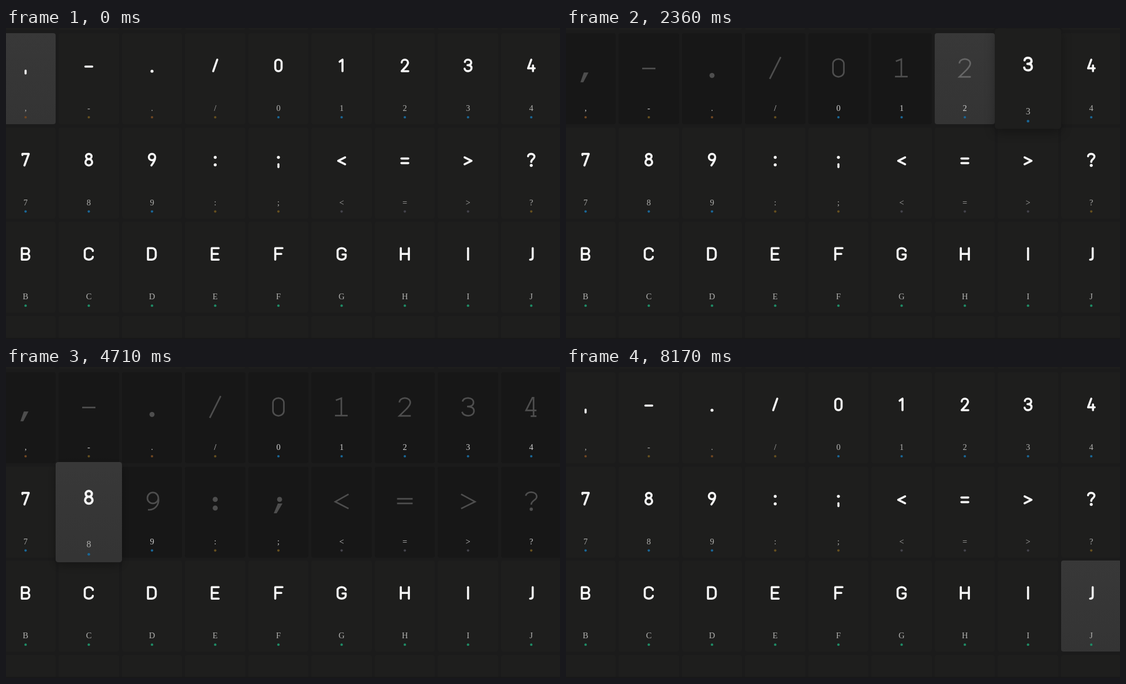
These frames come from a looping animation (960x540 px, 8.23 s). An HTML page with a canvas:

```html
<!DOCTYPE html>
<html lang="en">
<head>
<meta charset="utf-8">
<title>Glyph grid</title>
<style>
html, body { margin: 0; width: 100%; height: 100%; overflow: hidden; background: #1b1b1b; }
canvas { display: block; }
</style>
</head>
<body>
<canvas id="stage" width="960" height="540"></canvas>
<script>
const ctx = document.getElementById('stage').getContext('2d');
const LOOP = 8230;
const ROWS = [',-./01234', '789:;<=>?', 'BCDEFGHIJ'];
const LAST = 26;

// Centre lines of the bold rounded letterforms, cap height -10..10
const BOLD = {
  ',': 'M0 9V14',
  '-': 'M-6 2H6',
  '.': '',
  '/': 'M-3.5 10L3.5-10',
  '0': 'M-5.5-4.5a5.5 5.5 0 0 1 11 0v9a5.5 5.5 0 0 1-11 0z',
  '1': 'M-3.5-6.5L1.5-10V10',
  '2': 'M-5.5-5a5.5 5 0 0 1 11 0c0 3-2 5-4 7.5L-5.5 10H6',
  '3': 'M-5.5-6C-5-11.5 5.5-11.5 5.5-5C5.5-1.5 3-.5-1-.5C3-.5 6 1 6 4.5C6 11.5-5 11.5-6 5.5',
  '4': 'M0-10L-5.5 5H6M3 0V10',
  '7': 'M-5.5-8V-10H5.5L-2 10',
  '8': 'M-4.8-5.5a4.8 4.5 0 1 1 9.6 0a4.8 4.5 0 1 1-9.6 0zM-5.8 4.5a5.8 5.5 0 1 1 11.6 0a5.8 5.5 0 1 1-11.6 0z',
  '9': 'M5.5-4.5a5.5 5.5 0 1 0-11 0a5.5 5.5 0 1 0 11 0C5.5 0 3 5-1 10',
  ':': '',
  ';': 'M0 8V13',
  '<': 'M6-4L-6 2L6 8',
  '=': 'M-6-2H6M-6 6H6',
  '>': 'M-6-4L6 2L-6 8',
  '?': 'M-5.5-6C-5-11.5 5.5-11.5 5.5-5C5.5-1 0-1 0 4',
  'B': 'M-6.5 0H1a5 5 0 0 0 0-10H-6.5V10H1.5a5 5 0 0 0 0-10',
  'C': 'M7-5a7 5 0 0 0-14 0v10a7 5 0 0 0 14 0',
  'D': 'M-7-10V10H0a6.5 6.5 0 0 0 6.5-6.5V-3.5A6.5 6.5 0 0 0 0-10z',
  'E': 'M6-10H-6V10H6M-6 0H4.5',
  'F': 'M7-10H-5.5V10M-5.5 0H5',
  'G': 'M7-5a7 5 0 0 0-14 0v10a7 5 0 0 0 14 0V1H1.5',
  'H': 'M-7-10V10M7-10V10M-7 0H7',
  'I': 'M0-10V10',
  'J': 'M2.5-10V6C2.5 9 1 10-2 10'
};

// Slabs added to the same centre lines for the thin placeholder
const SLABS = {
  'B': 'M-8-10h2M-8 10h2',
  'C': 'M7-10v5',
  'D': 'M-8-10h2M-8 10h2',
  'E': 'M-8-10h2M-8 10h2M6.5-10v4M6.5 10v-5M2-2v4',
  'F': 'M-8-10h2M-8 10h7M7-10v4M2-2v4',
  'G': 'M7-10v5M7 1h1.5',
  'H': 'M-8.5-10h5M3.5-10h5M-8.5 10h5M3.5 10h5',
  'I': 'M-6-10h12M-6 10h12',
  'J': 'M-3-10H7'
};

// Placeholders with a shape of their own
const THIN = {
  ',': '', ';': '',
  '-': 'M-11.5 1H11.5',
  '/': 'M-9.5 19L9.5-19',
  '1': 'M-10-11.5L-.5-15V15M-11.5 15H10.5',
  '4': 'M4 16V-16H2L-9 6H9M-1 16H9',
  '9': 'M11-5.5a9.5 9.5 0 1 0-19 0a9.5 9.5 0 1 0 19 0C13 6 5 16-7 15',
  '<': 'M12-12L-11 1L12 13',
  '=': 'M-13.5-4H13.5M-13.5 4H13.5',
  '>': 'M-12-12L12 1L-12 13'
};

// Slanted tails of the thin comma and semicolon
const TAILS = {
  ',': new Path2D('M-3 8H5L-4 25H-9z'),
  ';': new Path2D('M-1 4H7L-3 21H-8z')
};

// Heights of round dots: bold, then thin
const DOTS = {
  '.': [[10], [13]],
  ':': [[-4, 9], [-3, 12]],
  ';': [[-4], [-3]],
  '?': [[10], [14]]
};

function thinPath(ch) {
  if (ch in THIN) return new Path2D(THIN[ch]);
  const path = new Path2D();
  const tall = ch in SLABS ? 1.48 : 1.55;
  path.addPath(new Path2D(BOLD[ch] + (SLABS[ch] || '')), new DOMMatrix([1.72, 0, 0, tall, 0, 0]));
  return path;
}

function dotColor(ch) {
  if (/\d/.test(ch)) return '#1a6797';
  if (/[A-Z]/.test(ch)) return '#1f8c66';
  if (/[<=>]/.test(ch)) return '#44434b';
  return /[,.]/.test(ch) ? '#704722' : '#66501f';
}

const cardX = col => 33.95 + 109.53 * col;
const cardY = row => 88 + 163.6 * row;

// Cells in the order they are visited: right, back left, right again
const cells = [];
ROWS.forEach((chars, row) => {
  [...chars].forEach((ch, col) => {
    cells.push({
      ch, x: cardX(col), y: cardY(row),
      order: row * 9 + (row === 1 ? 8 - col : col),
      bold: new Path2D(BOLD[ch]), thin: thinPath(ch), dot: dotColor(ch)
    });
  });
});

const pickAt = k => k === 0 ? 0 : 816 + 241.8 * k;
const clearAt = k => 896 + 244 * k;
const undoAt = k => 8170 - 31.7 * k;

function disc(x, y, r) {
  ctx.beginPath();
  ctx.arc(x, y, r, 0, Math.PI * 2);
  ctx.fill();
}

function cardShape(x, y, scale) {
  const w = 104.4 * scale, h = 158 * scale;
  const left = Math.round(x - w / 2), top = Math.round(y - h / 2);
  ctx.beginPath();
  ctx.roundRect(left, top, Math.round(x + w / 2) - left, Math.round(y + h / 2) - top, 4 * scale);
}

function drawGlyph(cell, empty) {
  const { ch } = cell;
  ctx.save();
  ctx.translate(0, empty ? -18.7 : -23);
  ctx.lineCap = empty ? 'butt' : 'round';
  ctx.lineJoin = empty ? 'miter' : 'round';
  ctx.lineWidth = empty ? 2.7 : 3.6;
  ctx.strokeStyle = ctx.fillStyle = empty ? 'rgba(255,255,255,.24)' : '#f6f6f6';
  ctx.stroke(empty ? cell.thin : cell.bold);
  if (empty && TAILS[ch]) ctx.fill(TAILS[ch]);
  for (const y of (DOTS[ch] || [[], []])[empty ? 1 : 0]) {
    disc(empty && ch === ';' ? 2 : 0, y, empty ? (ch === '?' ? 2.8 : 4.4) : 2.6);
  }
  ctx.restore();
}

function drawCell(cell, t, picked, raised) {
  const k = cell.order;
  const empty = t >= clearAt(k) && t < undoAt(k);
  const scale = raised ? 1.1 : 1;

  ctx.save();
  if (raised) {
    ctx.shadowColor = 'rgba(0,0,0,.3)';
    ctx.shadowBlur = 18;
    ctx.shadowOffsetY = 6;
  }
  if (picked) {
    const shade = ctx.createLinearGradient(0, cell.y - 79, 0, cell.y + 79);
    shade.addColorStop(0, '#383838');
    shade.addColorStop(1, '#343434');
    ctx.fillStyle = shade;
  } else {
    ctx.fillStyle = empty ? '#171717' : '#1e1e1d';
  }
  cardShape(cell.x, cell.y, scale);
  ctx.fill();
  ctx.restore();

  ctx.save();
  ctx.translate(cell.x, cell.y);
  ctx.scale(scale, scale);
  drawGlyph(cell, empty);
  ctx.font = '14.5px "Liberation Serif", serif';
  ctx.textAlign = 'center';
  ctx.fillStyle = empty ? '#cecece' : '#b2b2b0';
  ctx.fillText(cell.ch, 0, 56);
  ctx.fillStyle = cell.dot;
  disc(0, 67, 2.1);
  ctx.restore();
}

function draw(t) {
  let picked = 0;
  while (picked < LAST && t >= pickAt(picked + 1)) picked++;
  const slot = Math.floor((t - clearAt(-1)) / 244);
  const raised = slot >= 0 && slot <= LAST ? slot : -1;

  ctx.fillStyle = '#1b1b1b';
  ctx.fillRect(0, 0, 960, 540);
  ctx.fillStyle = '#1e1e1d';
  for (let col = 0; col < 9; col++) {
    for (const row of [-1, 3]) {
      cardShape(cardX(col), cardY(row), 1);
      ctx.fill();
    }
  }
  ctx.fillStyle = '#181818';
  ctx.fillRect(0, 538, 960, 2);

  for (const cell of cells) {
    if (cell.order !== raised) drawCell(cell, t, cell.order === picked, false);
  }
  const top = cells.find(cell => cell.order === raised);
  if (top) drawCell(top, t, top.order === picked, true);
}

const start = performance.now();
function tick() {
  draw((performance.now() - start) % LOOP);
  requestAnimationFrame(tick);
}
tick();
</script>
</body>
</html>
```
